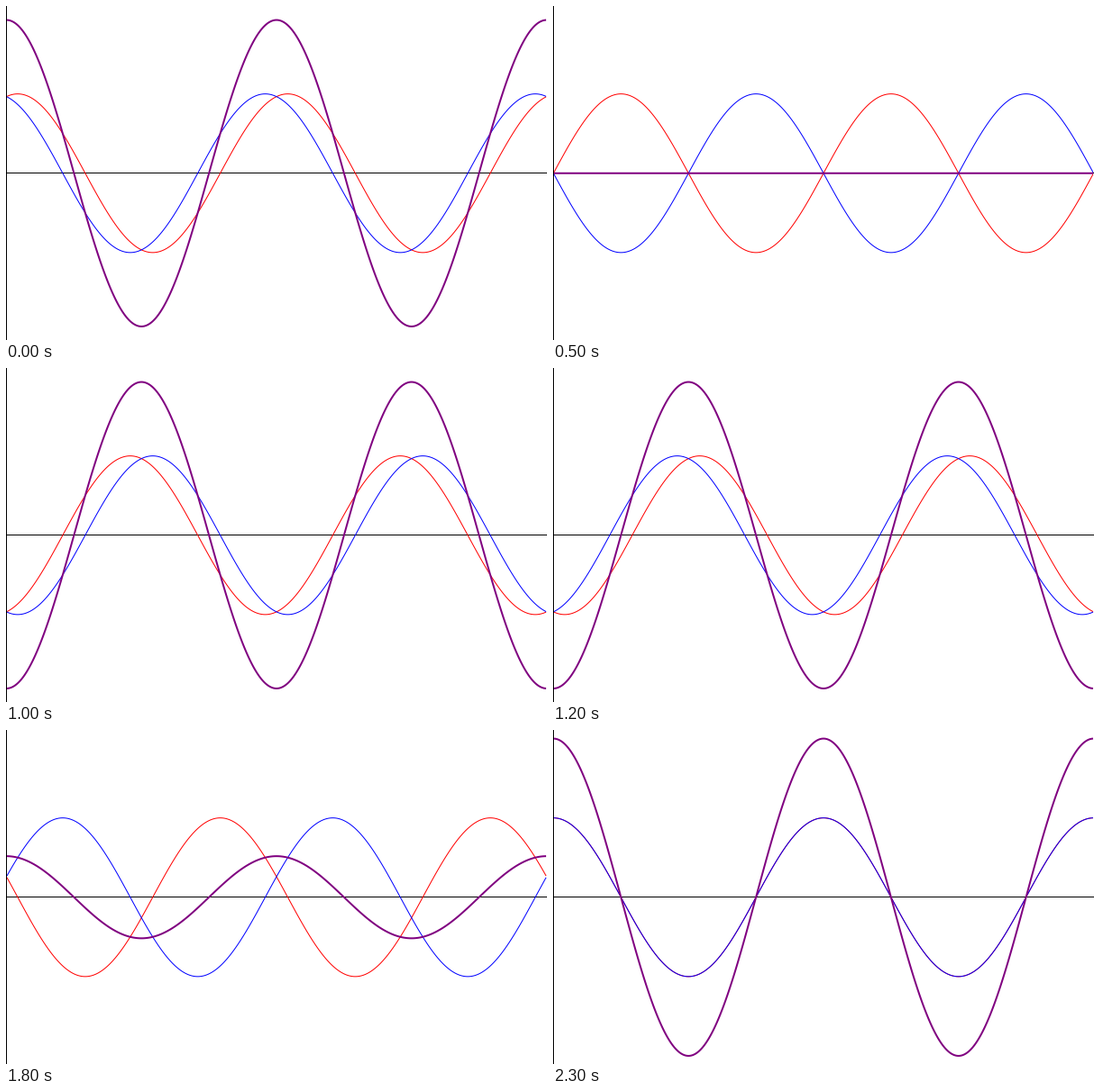
Write a matplotlib script that moves like this. It is 600 px wide and 371 px high and loops after 2.4 s.

```python
import numpy as np
import matplotlib.pyplot as plt
from matplotlib.animation import FuncAnimation

W, H, DPI = 600, 371, 100
FRAMES, INTERVAL = 24, 100
LEFT, RIGHT = 0.5, 599.5
AXIS_Y, WAVE_Y, AMP = 185.5, 185.75, 88.1

plt.rcParams["toolbar"] = "None"
plt.rcParams["path.simplify"] = False

fig = plt.figure(figsize=(W / DPI, H / DPI), dpi=DPI, facecolor="white")
ax = fig.add_axes([0, 0, 1, 1])
ax.set_xlim(0, W)
ax.set_ylim(H, 0)
ax.axis("off")


def stroke(x, y, color, px, z):
    # Snapping would push the straight lines off their pixel rows.
    line, = ax.plot(x, y, color=color, lw=px * 72 / DPI, zorder=z, snap=False,
                    solid_capstyle="butt", solid_joinstyle="round")
    return line


x = np.linspace(1, 599, 1197)
angle = 4 * np.pi * (x - LEFT) / (RIGHT - LEFT)

stroke([0, W], [AXIS_Y, AXIS_Y], "black", 1, 1)
stroke([0.5, 0.5], [0, H], "black", 1, 5)
right_wave = stroke(x, x, "#ff0000", 1, 2)
left_wave = stroke(x, x, "#0000ff", 1, 3)
total = stroke(x, x, "#800080", 2, 4)


def update(i):
    phase = 2 * np.pi * (i + 1) / FRAMES
    forward = AMP * np.cos(angle - phase)
    backward = AMP * np.cos(angle + phase)
    right_wave.set_ydata(WAVE_Y - forward)
    left_wave.set_ydata(WAVE_Y - backward)
    total.set_ydata(WAVE_Y - forward - backward)
    return right_wave, left_wave, total


anim = FuncAnimation(fig, update, frames=FRAMES, interval=INTERVAL,
                     repeat=True, repeat_delay=0, blit=False)
plt.show()
```
